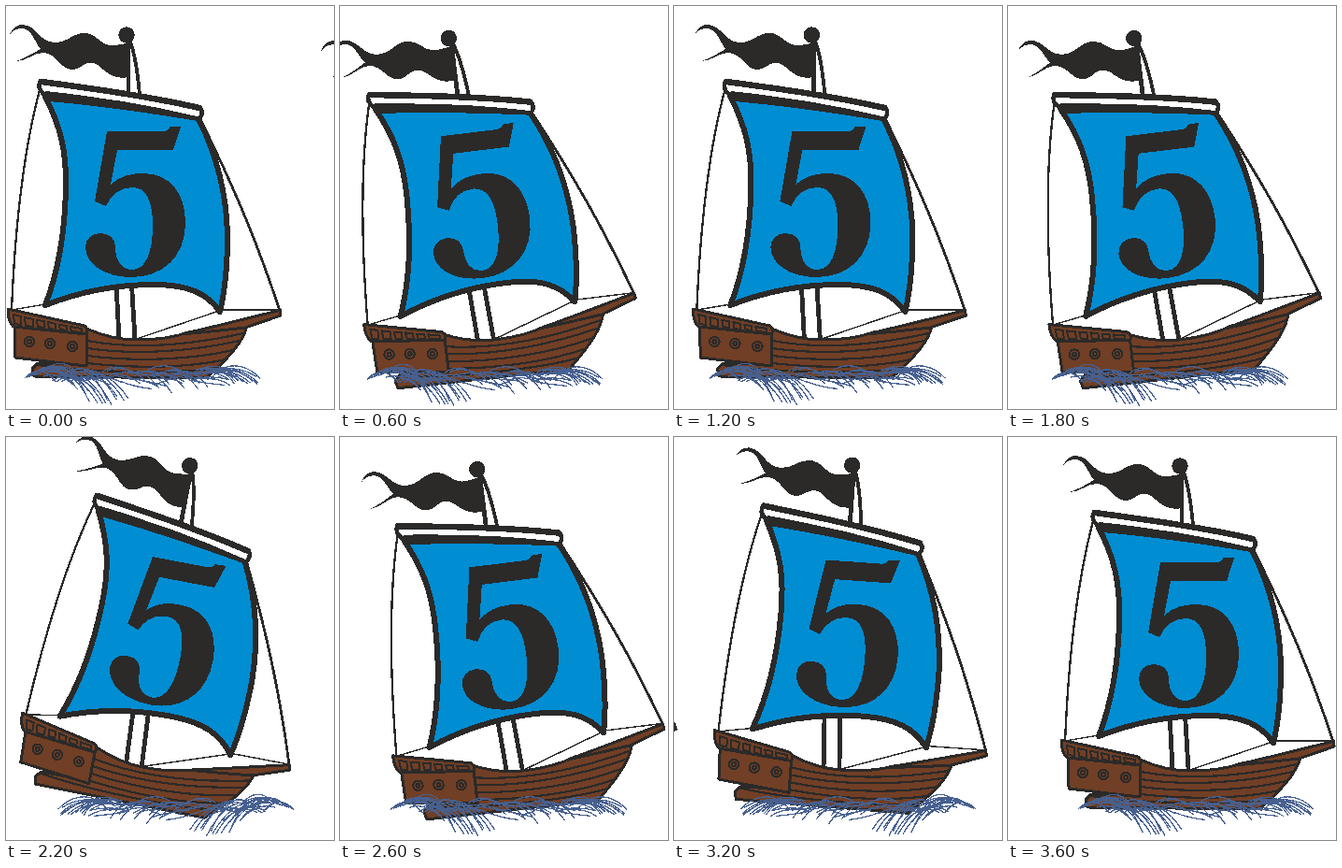
An HTML page for the animation above (3800 ms loop, 351 by 431 pixels).

```html
<!DOCTYPE html>
<html lang="en">
<head>
<meta charset="utf-8">
<title>Sailing ship</title>
<style>
  html, body { margin: 0; width: 100%; height: 100%; overflow: hidden; background: #fff; }
  svg { display: block; width: 100%; height: 100%; shape-rendering: crispEdges; }
  .ink { fill: #2b2a29; }
  .line { fill: none; stroke: #2b2a29; stroke-linecap: round; stroke-linejoin: round; }
  .wood { fill: #713f25; stroke: #2b2a29; stroke-width: 3; stroke-linejoin: round; }
  .foam { fill: none; stroke: #47608f; stroke-width: 1.25; stroke-linecap: round; }
</style>
</head>
<body>
<svg viewBox="0 0 351 431" role="img" aria-label="Ship with the number 5 on its sail">
  <defs>
    <g id="ship">
      <!-- rigging -->
      <g class="line">
        <path d="M36 90C20 150 10 230 6 325" stroke-width="2.3"/>
        <path d="M208 121C243 192 268 250 293 326" stroke-width="2.8"/>
        <path d="M6 325L42 319M228 325H294M137 357L228 326" stroke-width="1.4"/>
      </g>
      <!-- mast and flag -->
      <path d="M118 298L121 357H138L135 298Z" fill="#fff"/>
      <path class="line" stroke-width="4.8" d="M118 298L121 356M134.500 298L138 356M131 38V93"/>
      <path class="line" stroke-width="3.8" d="M133 38C138 52 141 72 143 95"/>
      <path class="ink" d="M4 30C8 22 13 20 18 20C33 21 36 39 52 39C66 39 70 30 82 29C97 28 100 42 113 42C121 42 126 40 131 40V76C118 79 110 73 104 68C96 60 90 59 83 63C76 68 71 69 66 67C57 64 54 52 41 50C31 49 22 59 11 59C20 56 30 50 37 46C31 40 28 24 17 24C10 24 7 27 4 30Z"/>
      <circle class="ink" cx="129" cy="31" r="8.7"/>
      <!-- sail -->
      <path id="sail" d="M206 121C226 160 236 200 237 245C237 280 234 306 229 327C215 307 195 298 158 298C125 298 85 303 42 320C56 284 63 245 64 195C65 155 58 128 42 97" fill="#008dd2" stroke="#2b2a29" stroke-width="6" stroke-linejoin="round" stroke-linecap="round"/>
      <path d="M48 98L206 121L150 103L60 92Z" fill="#008dd2"/>
      <path class="line" style="fill:#fff" stroke-width="4.5" d="M37 80C90 88 150 96 208 109Q212 114 207 121C150 107 90 98 40 94Q33 88 37 80Z"/>
      <path class="line" stroke-width="6.5" d="M38 81C90 88 150 96 207 109"/>
      <path class="ink" d="M42 91Q115 98 207 120L205 123Q115 108 46 102Z"/>
      <path class="ink" d="M108 134H169Q174 133 175 129.500L187 129L179 154H119L112 191C122 182 132 179 147 179C175 179 192 200 192 232C192 268 168 290 134 290C106 290 85 276 85 258C85 249 92 243 101 243C111 243 117 249 117 258C117 273 124 282 135 282C150 282 157 262 157 235C157 208 150 194 135 194C122 194 113 201 107 214L95 209Z"/>
      <!-- hull -->
      <path class="wood" d="M86 345C104 353 122 357 140 357C164 357 184 353 195 349L258 342C254 358 242 372 222 391L214 398L30 396L28 388L34 382H86Z"/>
      <path class="wood" d="M9 342L86 349V385L10 376Z"/>
      <path class="wood" d="M2 324L84 342Q89 346 86 351L8 343Q2 338 2 324Z"/>
      <path class="wood" d="M188 351L230 341L293 325.500L294 331L256 344Q222 348 188 351Z"/>
      <path class="line" stroke-width="2.2" d="M87 358C140 368 200 362 254 350M87 366C140 374 200 369 250 358M87 374C140 381 200 378 243 368M87 382C140 388 195 387 235 378M34 384C90 392 180 394 226 387"/>
      <path class="line" stroke-width="2" d="M8 330L16 332V341L9 340ZM20 333L29 335V343L21 342ZM33 336L41 337V344L34 343ZM45 338L53 340V346L46 345ZM57 341L65 342V347L58 346ZM69 343L81 345V349L70 348Z"/>
      <g id="portholes" class="line" stroke-width="2.1"></g>
    </g>
    <g id="waves" class="foam"></g>
  </defs>
  <g id="stage"></g>
</svg>
<script>
const STEP = 200, COUNT = 19, WIDTH = 351, DRIFT = 3.06;
const PIVOT = { x: 147, y: 213 };
const POSES = [
  { tilt: 0, dx: 0, dy: 0, flip: 1 },
  { tilt: -7, dx: -5, dy: 0, flip: 1 },
  { tilt: -11.2, dx: -3, dy: 1, flip: 1 },
  { tilt: -6.9, dx: 0, dy: 1, flip: 1 },
  { tilt: 4, dx: 0, dy: 0, flip: -1 },
  { tilt: 10.7, dx: 0, dy: 0, flip: -1 }
];

const byId = id => document.getElementById(id);

function add(parent, tag, attrs) {
  const node = document.createElementNS("http://www.w3.org/2000/svg", tag);
  for (const key in attrs) node.setAttribute(key, attrs[key]);
  return parent.appendChild(node);
}

let seed = 11;
function between(low, high) {
  seed = (seed * 16807) % 2147483647;
  return low + (high - low) * seed / 2147483647;
}

// A blade that rises by `lift`, then falls away to its end.
function strand(x, y, dx, dy, lift) {
  const d = `M${x} ${y}c${dx * 0.3} ${-lift} ${dx * 0.7} ${dy * 0.4 - lift} ${dx} ${dy}`;
  add(byId("waves"), "path", { d });
}

function repeat(count, draw) {
  for (let i = 0; i < count; i++) draw(i / (count - 1));
}

for (const [cx, cy] of [[25, 359], [47, 361], [71, 364]]) {
  add(byId("portholes"), "circle", { cx, cy, r: 5.2 });
  add(byId("portholes"), "circle", { cx, cy, r: 2 });
}

// Crests at the stern, the long band along the hull, hanging strands, then the bow wake.
repeat(10, k => strand(20 + 22 * k, 398 - 7 * k, between(30, 48), between(-4, 6), between(8, 14)));
repeat(38, k => strand(40 + 180 * k, between(389, 402), between(24, 40), between(-4, 9), between(-6, 9)));
repeat(14, k => strand(40 + 46 * k, between(388, 397), between(34, 46), 16 + 16 * Math.sin(2.6 * k) + between(-3, 2), between(2, 8)));
repeat(10, k => strand(130 + 60 * k, between(391, 396), between(24, 38), between(8, 18), between(1, 6)));
repeat(12, k => strand(200 + 30 * k, between(388, 396), between(36, 48), between(4, 14), between(3, 9)));

// Ships sit on one long strip; the stage shows one slot and whatever reaches in from its neighbours.
const slots = [-1, 0, 1].map(offset => {
  const group = add(byId("stage"), "g", {});
  return {
    offset, group,
    ship: add(group, "use", { href: "#ship" }),
    waves: add(group, "use", { href: "#waves" })
  };
});

function show(index) {
  for (const { offset, group, ship, waves } of slots) {
    const place = index + offset;
    const visible = place >= 0 && place < COUNT;
    group.setAttribute("display", visible ? "inline" : "none");
    if (!visible) continue;
    const { tilt, dx, dy, flip } = POSES[place % POSES.length];
    const mirror = flip < 0 ? 2 * PIVOT.x : 0;
    group.setAttribute("transform", `translate(${place * DRIFT + offset * WIDTH} 0)`);
    ship.setAttribute("transform", `rotate(${tilt} ${PIVOT.x} ${PIVOT.y})`);
    waves.setAttribute("transform", `translate(${mirror + dx} ${dy}) scale(${flip} 1)`);
  }
}

const start = performance.now();
function tick() {
  show(Math.floor((performance.now() - start) / STEP) % COUNT);
  requestAnimationFrame(tick);
}
tick();
</script>
</body>
</html>
```
